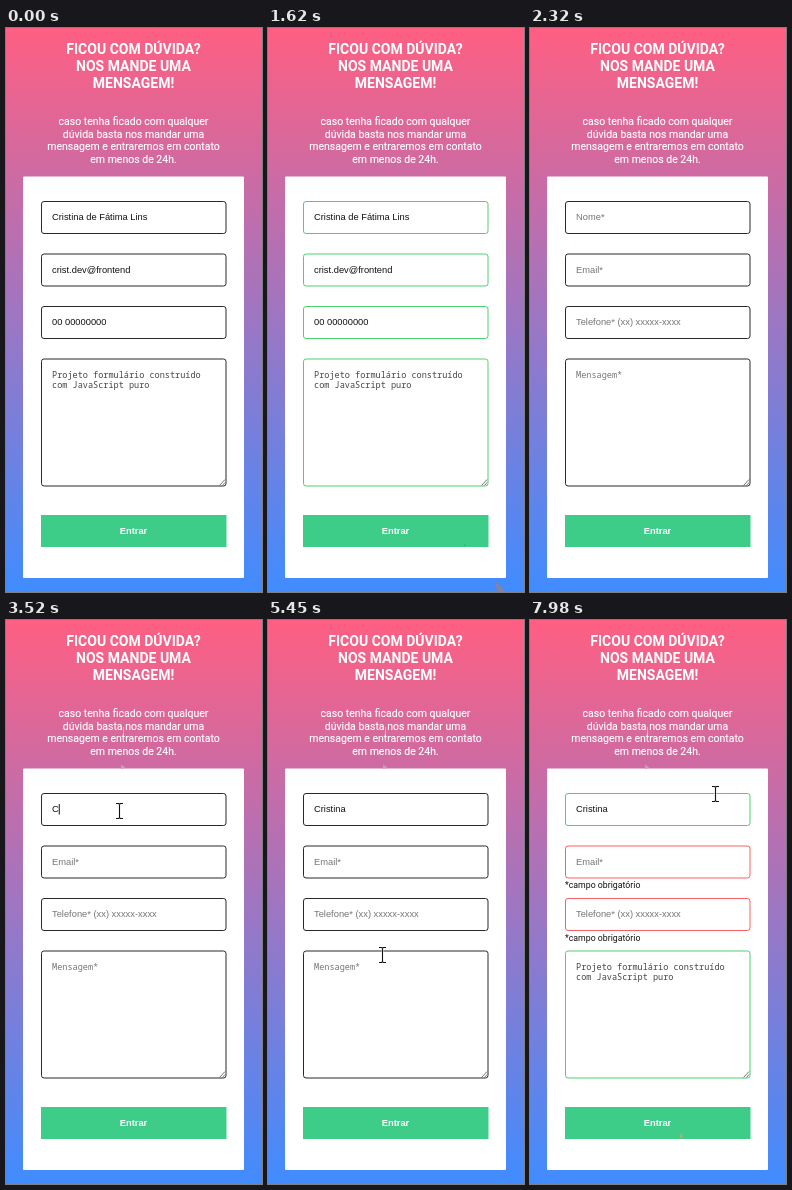
An HTML page for the animation above (8000 ms loop, 256 by 564 pixels).

```html
<!DOCTYPE html>
<html lang="pt-BR">
<head>
<meta charset="utf-8">
<title>Formulário</title>
<style>
  html, body { margin: 0; width: 100%; height: 100%; overflow: hidden; background: #fefefe; }
  svg { display: block; width: 100vw; height: 100vh; }
  text { white-space: pre; }
  .title { font: 700 14px Roboto, sans-serif; fill: #fff; text-anchor: middle; }
  .lead { font: 400 10.5px Roboto, sans-serif; fill: #fff; stroke: #fff; stroke-width: .15; text-anchor: middle; }
  .input { font: 9.33px "Liberation Sans", Arial, sans-serif; }
  .area { font: 8.55px "Noto Sans Mono", monospace; }
  .error { font: 8.75px Roboto, sans-serif; fill: #111; }
  .button { font: 700 9.33px "Liberation Sans", Arial, sans-serif; fill: #fff; text-anchor: middle; }
  .field { fill: #fff; stroke-width: 1; }
</style>
</head>
<body>
<svg viewBox="0 0 256 564" id="stage">
  <defs>
    <linearGradient id="sky" x1="0" y1="0" x2="0" y2="1">
      <stop offset="0" stop-color="#ff5f82"/>
      <stop offset="1" stop-color="#408cff"/>
    </linearGradient>
  </defs>
  <rect width="256" height="564" fill="#fefefe"/>
  <g id="page">
    <rect width="256" height="564" fill="url(#sky)"/>
    <g id="heading"></g>
    <rect x="17" y="148.5" width="221" height="401.5" rx="1" fill="#fff"/>
    <g id="form"></g>
    <path d="M213.5 457.5L219 451.5M216.5 457.5L219 454.5" stroke="#555" stroke-width=".8"/>
    <rect x="35" y="487" width="185.5" height="32" fill="#3dcd89"/>
    <text class="button" x="127.5" y="506.2">Entrar</text>
    <path id="caret" stroke="#111" stroke-width="1"/>
    <path id="trailCorner" d="M227 553L238 564H229Z" fill="#8284a6"/>
    <path id="trailButton" d="M196 515l2 2.5l-1.5 1z" fill="#36b278"/>
    <path id="trailLead" d="M117.5 107V118" stroke="#fff" stroke-opacity=".45"/>
    <path id="trailCard" d="M115 144.5L119.5 147.5L115 149Z" fill="#bb9fc4"/>
    <path id="trailSend" d="M150 513l3.5 4l-3.5 1z" fill="#a9b070"/>
    <g id="cursor">
      <g id="beam" fill="none">
        <path d="M-3.5-7.5H-1L0-6.7L1-7.5H3.5M0-7V7M-3.5 7.5H-1L0 6.7L1 7.5H3.5" stroke="#fff" stroke-width="2.2" opacity=".6"/>
        <path d="M-3.5-7.5H-1L0-6.7L1-7.5H3.5M0-7V7M-3.5 7.5H-1L0 6.7L1 7.5H3.5" stroke="#111" stroke-width="1.1"/>
      </g>
      <path id="arrow" d="M0 0V12L2.8 9.4L4.7 13.6L6.5 12.8L4.7 8.7H8.5Z" fill="#fff" stroke="#111" stroke-width=".7"/>
      <path id="hand" d="M-1 1Q0-.6 1 1V5.5Q2.4 4.6 3 6Q4.4 5.2 5 6.6Q6.6 6 6.8 7.6V11L5.5 15H-.8L-4.4 9.8Q-4.6 8-2.8 8.7L-1 10.2Z" fill="#fff" stroke="#111" stroke-width=".8"/>
    </g>
  </g>
</svg>
<script>
const LOOP = 8000;
const $ = id => document.getElementById(id);
const DARK = '#2c2729', GREEN = '#4dd070', RED = '#f76062';
const NAME = 'Cristina', FULL = NAME + ' de Fátima Lins';
const MESSAGE = ['Projeto formulário construído', 'com JavaScript puro'];
const KEYS = [3520, 3820, 3920, 4120, 4230, 4440, 4540, 4640];
const RELOAD = 2220, READY = 2320, PASTE = 6360, SEND = 7080;

function add(parent, tag, attrs, content = '') {
  const el = document.createElementNS('http://www.w3.org/2000/svg', tag);
  for (const k in attrs) el.setAttribute(k, attrs[k]);
  el.textContent = content;
  return parent.appendChild(el);
}

['FICOU COM DÚVIDA?', 'NOS MANDE UMA', 'MENSAGEM!']
  .forEach((s, i) => add($('heading'), 'text', { class: 'title', x: 127.5, y: 26 + 17 * i }, s));
['caso tenha ficado com qualquer', 'dúvida basta nos mandar uma',
  'mensagem e entraremos em contato', 'em menos de 24h.']
  .forEach((s, i) => add($('heading'), 'text', { class: 'lead', x: 127.5, y: 97 + 12.7 * i }, s));

const form = $('form');
const fields = [[173.5, 32], [226, 32], [278.5, 32], [331, 127]].map(([y, height], i) => {
  const box = add(form, 'rect', { class: 'field', x: 35.5, y, width: 184.5, height, rx: 2.5 });
  const cls = i < 3 ? 'input' : 'area';
  const base = i < 3 ? y + 18.8 : y + 18.7;
  const lines = [0, 10.1].map(dy => add(form, 'text', { class: cls, x: 46, y: base + dy }));
  return { box, lines };
});
const errors = [268, 321].map(y => add(form, 'text', { class: 'error', x: 35, y }, '*campo obrigatório'));

// Cursor stops: time, shape, x, y
const stops = [
  [0], [310, 'arrow', 228, 551], [410, 'arrow', 207, 528], [500, 'hand', 190, 508], [600, 'hand', 185, 507],
  [1410, 'arrow', 206, 400], [1520, 'arrow', 242, 101], [1620],
  [2420, 'arrow', 232, 84], [2520, 'arrow', 165, 92], [2620, 'beam', 117.5, 112], [2720, 'arrow', 115, 144],
  [2820, 'beam', 114.5, 180], [2920, 'beam', 113.5, 191],
  [3820], [4740, 'beam', 115.5, 187], [4850, 'beam', 119.5, 199], [4950, 'beam', 120.5, 196],
  [5150, 'beam', 119.5, 202], [5250, 'beam', 117.5, 242], [5350, 'beam', 115.5, 292], [5450, 'beam', 114.5, 335],
  [5550, 'beam', 118.5, 348], [5650, 'beam', 121.5, 353],
  [6460, 'beam', 123.5, 388], [6560, 'beam', 128.5, 450], [6660, 'hand', 140, 494], [6760, 'arrow', 150, 530],
  [6860, 'hand', 150, 515], [7880, 'arrow', 169, 320], [7980, 'beam', 185.5, 174],
];

const show = (el, on) => el.setAttribute('visibility', on ? 'inherit' : 'hidden');

function setField(i, value, hint, border, color = '#111') {
  const { box, lines } = fields[i];
  const rows = value ? [].concat(value) : [hint];
  box.setAttribute('stroke', border);
  lines.forEach((el, n) => {
    const s = rows[n] || '';
    if (el.textContent !== s) el.textContent = s;
    el.setAttribute('fill', value ? color : '#757575');
  });
}

function drawCaret(t) {
  let x = 46.5, y = 0;
  if (t >= 3220 && t < 5150) {
    y = 184;
    const line = fields[0].lines[0];
    if (t >= KEYS[0]) x += line.getComputedTextLength();
  } else if (t >= 5750 && t < 6150) y = 342;
  else if (t >= PASTE && t < SEND) y = 363;
  show($('caret'), y > 0);
  $('caret').setAttribute('d', `M${x} ${y}v10.5`);
}

function drawCursor(t) {
  const [, shape, x = 0, y = 0] = stops.findLast(s => s[0] <= t);
  for (const id of ['beam', 'arrow', 'hand']) show($(id), id === shape);
  $('cursor').setAttribute('transform', `translate(${x} ${y})`);
}

function draw(t) {
  const first = t < RELOAD, sent = t >= SEND;
  const ok = first ? t >= 1120 : sent;
  const good = ok ? GREEN : DARK, bad = first ? good : sent ? RED : DARK;
  const typed = NAME.slice(0, KEYS.filter(k => k <= t).length);

  show($('page'), first || t >= READY);
  setField(0, first ? FULL : typed, t < 3220 ? 'Nome*' : t < 3520 ? 'Nome*' : '', good);
  setField(1, first && 'crist.dev@frontend', 'Email*', bad);
  setField(2, first && '00 00000000', 'Telefone* (xx) xxxxx-xxxx', bad);
  setField(3, (first || t >= PASTE) && MESSAGE, 'Mensagem*', good, '#444');
  errors.forEach(el => show(el, sent));

  show($('trailCorner'), first && t >= 410);
  show($('trailButton'), first && t >= 1410);
  show($('trailLead'), t >= 2720);
  show($('trailCard'), t >= 2820);
  show($('trailSend'), t >= 7880);
  drawCaret(t);
  drawCursor(t);
}

const start = performance.now();
function tick() {
  draw((performance.now() - start) % LOOP);
  requestAnimationFrame(tick);
}
tick();
</script>
</body>
</html>
```
